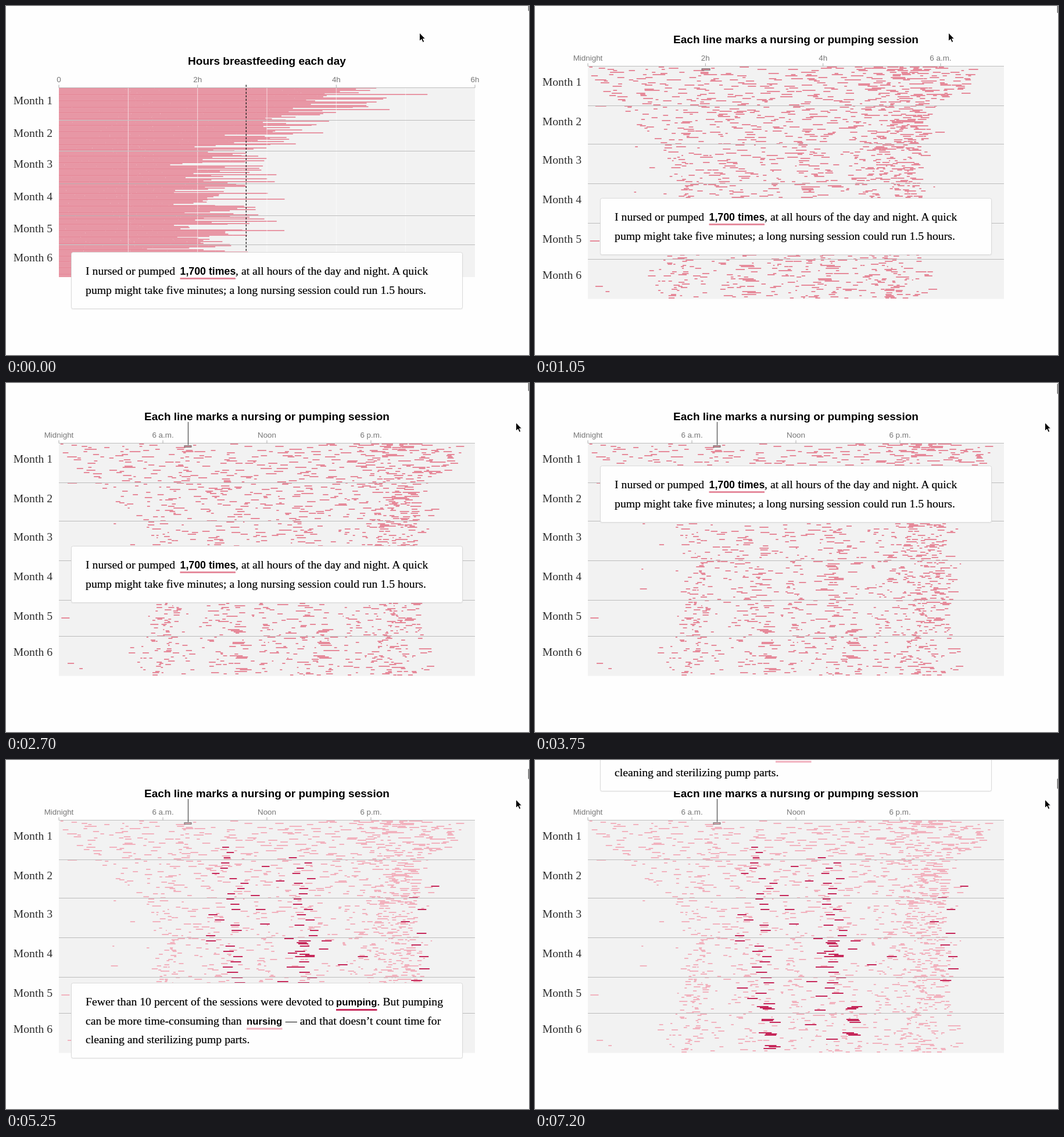
Write an HTML page that moves like this. It is 900 px wide and 600 px high and loops after 7.35 s.

```html
<!DOCTYPE html>
<html lang="en">
<head>
<meta charset="utf-8">
<title>Nursing and pumping sessions</title>
<style>
  html, body { margin: 0; width: 100%; height: 100%; overflow: hidden; background: #fefefe; }
  svg { display: block; width: 900px; height: 600px; }
  .title { font: bold 19.05px "Liberation Sans", Arial, sans-serif; text-anchor: middle; }
  .tick { font: 13.4px "Liberation Sans", Arial, sans-serif; text-anchor: middle; fill: #777; }
  .month { font: 19.7px "Liberation Serif", Times, serif; text-anchor: end; fill: #2e2e2e; }
  .body { font: 19.75px "Liberation Serif", Times, serif; fill: #000; stroke: #000; stroke-width: .2px; }
  .key { font: bold 17.8px "Liberation Sans", Arial, sans-serif; }
  .word { font: bold 16.7px "Liberation Sans", Arial, sans-serif; }
</style>
</head>
<body>
<svg id="stage" viewBox="0 0 900 600" xmlns="http://www.w3.org/2000/svg"></svg>
<script>
const LOOP = 7350, STEP = 150, SWITCH = 300;
const LEFT = 91, WIDTH = 716, ROWS = 178;
const STACK_HOUR = WIDTH / 6, DAY_HOUR = WIDTH / 24;
const MONTH_ROWS = [0, 30.4, 59.7, 90, 120.3, 147.8];
const ROSE = [230, 138, 154], PALE = [242, 178, 190], CRIMSON = [198, 40, 90];

// Times of day, in px, at which pumping sessions gather; rows run from..to.
const PUMP_COLUMNS = [
  { x: 384, from: 20, to: 141, every: 4, spread: 36 },
  { x: 510, from: 28, to: 135, every: 4, spread: 24 },
  { x: 470, from: 35, to: 172, every: 11, spread: 50 },
  { x: 714, from: 50, to: 125, every: 9, spread: 26 },
  { x: 580, from: 92, to: 116, every: 6, spread: 36 },
  { x: 519, from: 92, to: 110, burst: true, spread: 10 },
  { x: 404, from: 142, to: 175, burst: true, spread: 12 },
  { x: 548, from: 142, to: 167, burst: true, spread: 12 }
];

const lerp = (a, b, k) => a + (b - a) * k;
const clamp = v => Math.max(0, Math.min(1, v));
const ramp = (t, a, b) => clamp((t - a) / (b - a));
const ease = (t, a, b) => {
  const p = ramp(t, a, b);
  return p < .5 ? 4 * p ** 3 : 1 - 4 * (1 - p) ** 3;
};
const mix = (a, b, k) => `rgb(${a.map((v, i) => Math.round(lerp(v, b[i], k)))})`;
const track = (keys, t) => {
  const i = Math.max(1, keys.findIndex(k => k[0] >= t));
  const [a, b] = [keys[i - 1], keys[i]];
  return lerp(a[1], b[1], ramp(t, a[0], b[0]));
};

let seed = 20;
const rand = () => {
  seed = (seed + 0x6D2B79F5) | 0;
  let n = Math.imul(seed ^ seed >>> 15, 1 | seed);
  n = n + Math.imul(n ^ n >>> 7, 61 | n) ^ n;
  return ((n ^ n >>> 14) >>> 0) / 4294967296;
};
const spread = d => (rand() + rand() + rand() - 1.5) * d;

// Daily total: long days at first, levelling off near 2.3 hours.
const dayHours = r =>
  2.3 + 2.1 * Math.exp(-((r / 40) ** 2)) + spread(.75) + (rand() < .05 ? .9 : 0);

// Scattered round the clock at first, settling into regular times of day.
function sessionX(r, i, n) {
  const settled = .8 * ramp(r, 28, 100), late = r > 148;
  if (rand() < (late ? .1 : .025)) return lerp(95, 780, rand());
  if (rand() < settled) {
    const morning = 272 + 40 * Math.exp(-(((r - 78) / 14) ** 2));
    const times = [morning, 362, 445, 520, 600, 655, 678, 688, morning];
    return times[i % times.length] + spread(late ? 52 : 36);
  }
  if (rand() < .24) return lerp(lerp(597, 632, ramp(r, 0, 45)), lerp(745, 705, ramp(r, 0, 60)), rand());
  const lo = lerp(93, 240, ramp(r, 10, 62)), hi = lerp(795, 715, ramp(r, 5, 38));
  return lerp(lo, hi, (i + rand()) / n);
}

function replaceNearest(row, x, props) {
  const near = row.filter(s => !s.fixed)
    .reduce((a, b) => Math.abs(b.x - x) < Math.abs(a.x - x) ? b : a);
  Object.assign(near, { x, fixed: true }, props);
}

function addPumps(rows, { x, from, to, every, burst, spread: d }) {
  for (let r = from; r < to; r++) {
    const step = (r - from) % (burst ? 10 : every);
    if (step >= (burst ? 3 : 1)) continue;
    const w = .32 + .002 * r + .1 * rand();
    replaceNearest(rows[r], x + spread(d) - w * DAY_HOUR / 2, { w, pump: true });
  }
}

function buildRows() {
  const hours = Array.from({ length: ROWS }, (_, r) => dayHours(r));
  const rows = hours.map((h, r) => {
    const n = Math.round(5 + h * 1.5);
    return Array.from({ length: n }, (_, i) => ({ x: sessionX(r, i, n), w: .25 + rand() }));
  });
  PUMP_COLUMNS.forEach(column => addPumps(rows, column));
  replaceNearest(rows[2], 307, { w: .4, marked: true });

  rows.forEach((row, r) => {
    const sum = f => row.filter(f).reduce((a, s) => a + s.w, 0);
    const scale = Math.max(.15, (hours[r] - sum(s => s.fixed)) / sum(s => !s.fixed));
    let stacked = 0;
    row.sort((a, b) => a.x - b.x).forEach(s => {
      if (!s.fixed) s.w *= scale;
      s.stack = LEFT + stacked * STACK_HOUR;
      stacked += s.w;
    });
  });
  return rows;
}

const rows = buildRows();
const stage = document.getElementById('stage');
const TICKS = [[0, '0', 'Midnight'], [2, '2h', '2h'], [4, '4h', '4h'], [6, '6h', '6 a.m.'],
               [12, 'Noon', 'Noon'], [18, '6 p.m.', '6 p.m.']];

const text = (cls, x, y, s) => `<text class="${cls}" x="${x}" y="${y}">${s}</text>`;
const line = (x1, y1, x2, y2, color, extra = '') =>
  `<path d="M${x1} ${y1}L${x2} ${y2}" stroke="${color}" fill="none" ${extra}/>`;
const underline = (x, y, w, color) => `<rect x="${x}" y="${y}" width="${w}" height="3" fill="${color}"/>`;
const card = (id, height, content) => `<g id="${id}">
  <rect x="111.5" y="-.5" width="675" height="${height + 2}" rx="4" fill="#000" opacity=".035"/>
  <rect x="112.5" y="-.5" width="673" height="${height}" rx="3" fill="#fefefe" stroke="#dadada"/>
  ${content}</g>`;

stage.innerHTML = `
  <rect width="900" height="600" fill="#fefefe"/>
  <rect id="plot" x="${LEFT}" width="${WIDTH}" fill="#f2f2f2"/>
  <path id="nursing" fill="none"/><path id="pumping" fill="none"/>
  <g id="grid"></g><g id="axis"></g>
  <rect id="marked" fill="none" stroke="#666"/>
  <g id="pointer">${line(313.5, 67, 313.5, 106.5, '#555', 'stroke-width="1.3"')}</g>
  <text id="title" class="title" x="449"></text>
  ${card('first', 97,
    text('body', 137, 38, 'I nursed or pumped') + underline(299.5, 43, 95.5, '#e58b9d') +
    text('key', 299.5, 38, '1,700 times') +
    text('body', 395, 38, ', at all hours of the day and night. A quick') +
    text('body', 137, 70.5, 'pump might take five minutes; a long nursing session could run 1.5 hours.'))}
  ${card('second', 129,
    text('body', 137, 38, 'Fewer than 10 percent of the sessions were devoted to') +
    underline(568, 44, 70.5, '#c6285a') + text('word', 568, 38, 'pumping') +
    text('body', 638.5, 38, '. But pumping') +
    text('body', 137, 70.5, 'can be more time-consuming than') +
    underline(414, 76.5, 61.5, '#f1b0be') + text('word', 414, 70.5, 'nursing') +
    text('body', 481, 70.5, '— and that doesn’t count time for') +
    text('body', 137, 103, 'cleaning and sterilizing pump parts.'))}
  <rect id="thumb" x="898.6" width="4" height="17.5" rx="1" fill="#666"/>
  <path id="cursor" d="M0 0V14.5L3.4 11.3 5.8 16.5 8.3 15.4 6 10.4H10.2Z" fill="#000" stroke="#fff"/>`;

const el = id => document.getElementById(id);
const set = (id, attrs) => {
  for (const name in attrs) el(id).setAttribute(name, attrs[name]);
};

function drawBars(t, top, rowH) {
  const k = ease(t, 450, 1340), grow = ease(t, 370, 1265), tint = ramp(t, 4700, 5050);
  const hour = lerp(STACK_HOUR, DAY_HOUR, grow);
  const paths = { nursing: '', pumping: '' };
  rows.forEach((row, r) => {
    const y = Math.round(top + (r + .5) * rowH);
    row.forEach(s => {
      const x = lerp(s.stack, s.x, k), w = s.w * hour;
      paths[s.pump ? 'pumping' : 'nursing'] += `M${x.toFixed(1)} ${y}h${w.toFixed(1)}`;
      if (s.marked) set('marked', { x, y: y - 1.3, width: w, height: 2.6, opacity: k > .5 ? 1 : 0 });
    });
  });
  const weight = lerp(1.75, 2, ramp(t, 250, 850));
  set('nursing', { d: paths.nursing, stroke: mix(ROSE, PALE, tint), 'stroke-width': weight });
  set('pumping', { d: paths.pumping, stroke: mix(ROSE, CRIMSON, tint), 'stroke-width': weight });
}

function drawAxis(t, top, bottom, rowH) {
  const k = ease(t, 796, 1482), day = t >= SWITCH;
  const scale = lerp(STACK_HOUR, DAY_HOUR, k);
  let grid = '', axis = line(LEFT, top, LEFT + WIDTH, top, '#bdbdbd');
  for (let h = 1; h < 6; h++) {
    const x = LEFT + h * STACK_HOUR;
    grid += line(x, top, x, bottom, '#fff', `opacity="${.65 * (1 - ramp(t, 150, 600))}"`);
  }
  if (!day) grid += line(413.3, top - 5, 413.3, bottom, '#222', 'stroke-width="1.4" stroke-dasharray="3.5 2.5"');
  TICKS.forEach(([h, before, after]) => {
    const x = LEFT + h * scale;
    if (x > LEFT + WIDTH + 1) return;
    const opacity = h === 2 || h === 4 ? 1 - ramp(k, .3, .7) : 1;
    axis += `<g opacity="${opacity}">${line(x, top - 5, x, top, '#aaa')}
      ${text('tick', x, top - 10, day ? after : before)}</g>`;
  });
  MONTH_ROWS.forEach((row, m) => {
    const y = Math.floor(top + row * rowH) + .5;
    if (m) axis += line(LEFT, y, LEFT + WIDTH, y, '#bcbcbc');
    axis += text('month', 80, y + rowH * 12.3 + 6.3, `Month ${m + 1}`);
  });
  el('grid').innerHTML = grid;
  el('axis').innerHTML = axis;
}

function draw(t) {
  const v = ease(t, 250, 850);
  const top = lerp(140.5, 103.5, v), bottom = lerp(466, 503.5, v), rowH = (bottom - top) / ROWS;
  const scroll = track([[0, 424], [1050, 331], [1500, 300], [2400, 287], [2700, 281],
    [3750, 143], [5250, -246], [6450, -524], [7350, -741]], t);
  const move = ease(t, 1500, 2250);

  set('plot', { y: top, height: bottom - top });
  drawBars(t, top, rowH);
  drawAxis(t, top, bottom, rowH);
  set('pointer', { opacity: ramp(t, 1250, 1500) });
  set('title', { y: top - 40 });
  el('title').textContent = t < SWITCH ? 'Hours breastfeeding each day'
    : 'Each line marks a nursing or pumping session';
  set('first', { transform: `translate(0 ${Math.round(scroll)})` });
  set('second', { transform: `translate(0 ${Math.round(scroll + 630)})` });
  set('thumb', { y: (424 - scroll) * .0363 - 9 });
  set('cursor', { transform: `translate(${lerp(711.5, 877.5, move)} ${lerp(46, 68, move)})` });
}

const begin = performance.now();
let shown = -1;
function tick() {
  const t = Math.floor((performance.now() - begin) % LOOP / STEP) * STEP;
  if (t !== shown) draw(shown = t);
  requestAnimationFrame(tick);
}
tick();
</script>
</body>
</html>
```
